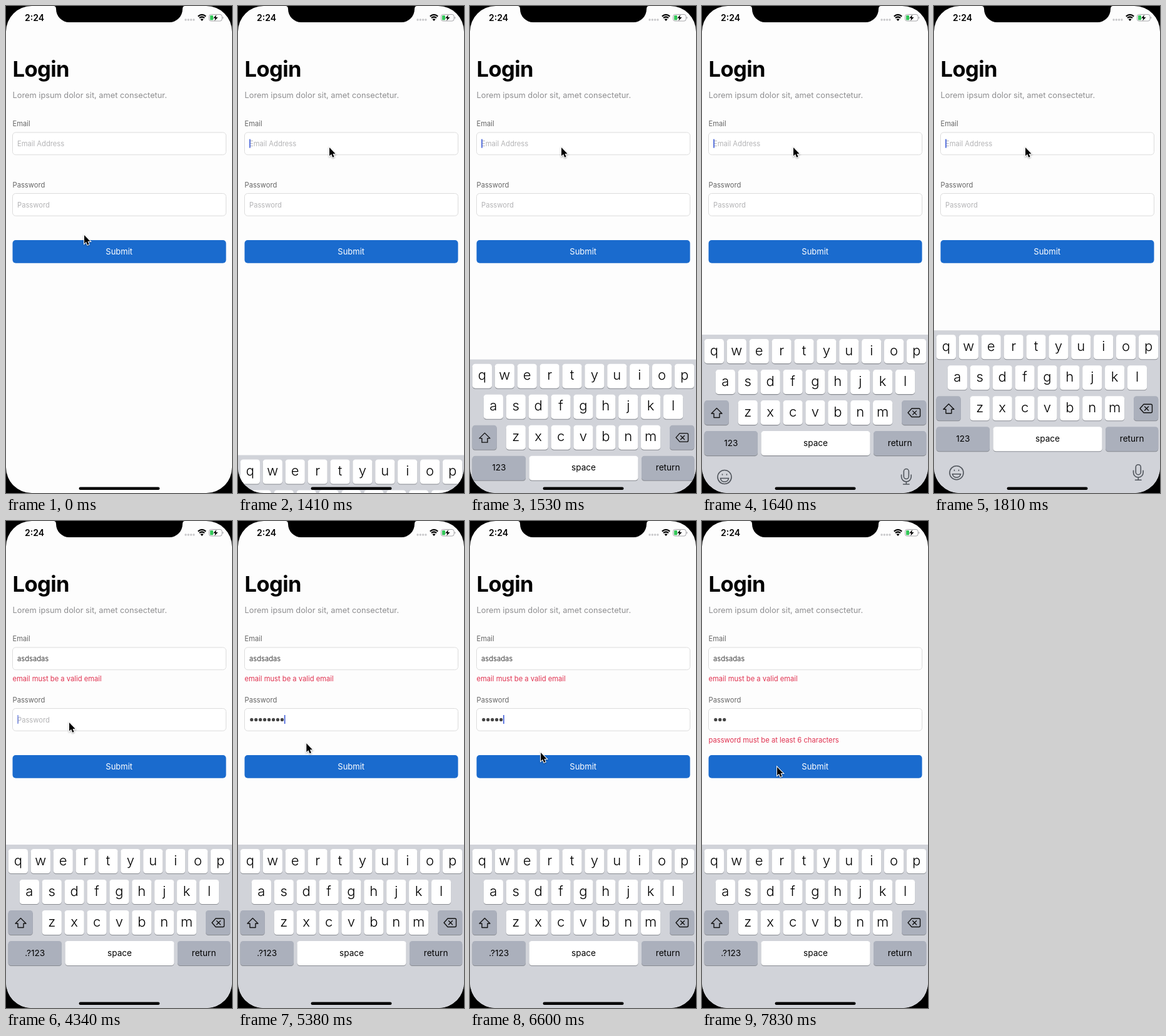
Animation, 361 px wide and 778 px high, one loop 8000 ms. Source, as an HTML page:

```html
<!DOCTYPE html>
<html lang="en">
<head>
<meta charset="utf-8">
<title>Login form</title>
<style>
html, body { margin: 0; width: 100%; height: 100%; overflow: hidden; background: #000; }
svg { display: block; width: 361px; height: 778px; }
text { font-family: Inter, Roboto, sans-serif; font-size: 11.2px; white-space: pre; }
.mid { text-anchor: middle; }
.title { font-size: 34.5px; font-weight: 700; letter-spacing: -.6px; }
.lead { font-size: 12.8px; fill: #8e8e90; }
.label { fill: #666; }
.hint { fill: #b4b4b6; }
.value { fill: #444; }
.error { fill: #e0314f; }
.box { fill: #fff; stroke: #dcdcdc; }
.letter { font-size: 22px; font-weight: 300; }
.word { font-size: 13.6px; }
.icon { fill: none; stroke: #111; stroke-width: 1.4; stroke-linejoin: round; stroke-linecap: round; }
.soft { fill: none; stroke: #50555c; stroke-width: 1.6; stroke-linecap: round; }
</style>
</head>
<body>
<svg viewBox="0 0 361 778">
  <defs><clipPath id="round"><rect width="361" height="778" rx="41"/></clipPath></defs>
  <rect width="361" height="778"/>
  <g clip-path="url(#round)">
    <rect width="361" height="778" fill="#fdfdfd"/>
    <text class="title" x="10.5" y="113">Login</text>
    <text class="lead" x="10.5" y="146.5">Lorem ipsum dolor sit, amet consectetur.</text>

    <text class="label" x="10.5" y="192">Email</text>
    <rect class="box" x="10.5" y="202" width="341" height="35.7" rx="5"/>
    <text class="hint" id="mailHint" x="18" y="224">Email Address</text>
    <text class="value" id="mail" x="18" y="224"></text>
    <text class="error" id="mailError" x="10.5" y="256">email must be a valid email</text>

    <text class="label" x="10.5" y="289.5">Password</text>
    <rect class="box" x="10.5" y="299.5" width="341" height="35.7" rx="5"/>
    <text class="hint" id="passHint" x="18" y="321.5">Password</text>
    <g id="dots" fill="#444"></g>
    <text class="error" id="passError" x="10.5" y="353.5">password must be at least 6 characters</text>

    <g id="button">
      <rect x="10.5" y="374" width="341" height="36.7" rx="5" fill="#1a6bce"/>
      <text class="mid" x="180.7" y="397.3" fill="#fff" style="font-size:13px">Submit</text>
    </g>
    <rect id="caret" width="1.7" height="14" fill="#4562da"/>

    <g id="keyboard">
      <rect width="361" height="270" fill="#d1d3d9"/>
      <g id="keys"></g>
      <path class="icon" d="M23.5 117.5L32 126H28V132.5H19V126H15Z"/>
      <path class="icon" d="M335 118H346.5Q348.5 118 348.5 120V129.5Q348.5 131.5 346.5 131.5H335L329 124.75ZM336.5 121.8L342.5 127.8M342.5 121.8L336.5 127.8"/>
      <g id="tools" class="soft">
        <circle cx="36" cy="227.5" r="11"/>
        <path d="M29.5 229.5Q30.5 235 36 235T42.5 229.5ZM32.5 223V224M39.5 223V224"/>
        <rect x="322.3" y="214.5" width="8" height="16" rx="4"/>
        <path d="M318.5 224V227A7.8 7.8 0 0 0 334.1 227V224M326.3 235V239M321.5 239H331"/>
      </g>
    </g>

    <path d="M76 0Q80 0 80 5A21 21 0 0 0 101 26H261A21 21 0 0 0 282 5Q282 0 286 0Z"/>
    <text x="30" y="23.5" style="font-size:14px;font-weight:600">2:24</text>
    <path d="M287 22H301" stroke="#c8c8ca" stroke-width="3.4" stroke-linecap="round" stroke-dasharray="0 4.3"/>
    <path d="M306.8 16.6Q313 11.2 319.2 16.6M309 19.2Q313 15.8 317 19.2" fill="none" stroke="#000" stroke-width="2.2"/>
    <path d="M310.5 21.2Q313 19.2 315.5 21.2L313 24Z"/>
    <rect x="324.5" y="13.5" width="20.5" height="10.5" rx="3" fill="#fff" stroke="#a5a5a8"/>
    <rect x="326" y="15" width="5" height="7.5" rx="1.3" fill="#34c759"/>
    <path d="M346 17V20.5Q347.3 20 347.3 18.75T346 17Z" fill="#a5a5a8"/>
    <path d="M336 14L331 19.5H334.3L333.2 23.8L338.5 17.9H335.2Z"/>
    <rect x="116.5" y="768.5" width="129" height="4.5" rx="2.25"/>
  </g>
  <path id="pointer" d="M0 0V13.6L3.1 10.8L5.2 15.8L7.6 14.8L5.5 9.9H9.6Z" stroke="#fff" stroke-width="2" style="paint-order:stroke;filter:drop-shadow(0 1px 1px #0005)"/>
</svg>
<script>
const LOOP = 8000, TICK = 58;
const MAIL_TAP = 1350, PASS_TAP = 3800, SUBMIT_TAP = 7660;
const WORD = "asdsadas", DOT_GAP = 6.95;
const $ = id => document.getElementById(id);
const clamp = (v, lo, hi) => Math.min(hi, Math.max(lo, v));
const show = (id, on) => $(id).style.display = on ? "" : "none";

// a run of keystrokes: n presses, gap ms apart; step -1 deletes
const run = (start, gap, n, step = 1) => ({ start, gap, n, step });
const mailRuns = [run(1990, 115, 3), run(2580, 60, 5)];
const passRuns = [run(4800, 1, 2), run(4970, 56, 6), run(6260, 170, 5, -1)];
const moves = [
  { start: 360, end: 760, x: 146, y: 226 },
  { start: 3060, end: 3570, x: 101, y: 322 },
  { start: 5140, end: 5540, x: 113, y: 370 },
  { start: 7310, end: SUBMIT_TAP, x: 120, y: 393 }
];

const presses = (r, t) => clamp(Math.floor((t - r.start) / r.gap) + 1, 0, r.n);
const count = (runs, t) => runs.reduce((sum, r) => sum + r.step * presses(r, t), 0);

function lastEdit(t) {
  const runs = [run(MAIL_TAP, 1, 1), run(PASS_TAP, 1, 1), ...mailRuns, ...passRuns];
  return Math.max(0, ...runs.filter(r => t >= r.start).map(r => r.start + r.gap * (presses(r, t) - 1)));
}

// solid after an edit, then fades out and back in
function caretAlpha(t) {
  if (t < MAIL_TAP || t >= SUBMIT_TAP) return 0;
  const s = t - lastEdit(t) - 540;
  const ticks = from => s < from ? 0 : Math.floor((s - from) / 60) + 1;
  return clamp(1 - ticks(0) * .35, 0, 1) + clamp(ticks(350) * .35, 0, 1);
}

function add(parent, tag, attrs, label = "") {
  const el = document.createElementNS("http://www.w3.org/2000/svg", tag);
  for (const k in attrs) el.setAttribute(k, attrs[k]);
  el.textContent = label;
  return $(parent).appendChild(el);
}

function key(x, row, width, label, dark, type = "word") {
  const y = 7 + row * 49, box = { x, width, height: 39, rx: 4.5 };
  add("keys", "rect", { ...box, y: y + 1.1, fill: "#898c92" });
  add("keys", "rect", { ...box, y, fill: dark ? "#abb0bc" : "#fff" });
  const base = y + (type === "letter" ? 25.5 : 23.8);
  return add("keys", "text", { class: "mid " + type, x: x + width / 2, y: base }, label);
}

["qwertyuiop", "asdfghjkl", "zxcvbnm"].forEach((letters, row) =>
  [...letters].forEach((c, i) =>
    key(181 + (i - letters.length / 2) * 35.9 + 2.3, row, 31.2, c, false, "letter")));
key(3.6, 2, 39.2, "", true);
key(319, 2, 39.2, "", true);
const modeKey = key(3.6, 3, 85.4, "123", true);
key(94.4, 3, 174.2, "space");
key(274, 3, 84.2, "return", true);
const dots = [...WORD].map((_, i) =>
  add("dots", "circle", { cx: 21.8 + i * DOT_GAP, cy: 317.4, r: 2.6 }));

function pointerAt(t) {
  let x = 125, y = 366;
  for (const m of moves) {
    if (t < m.start) break;
    const held = (Math.floor((t - m.start) / TICK) + 1) * TICK;
    const p = Math.min(1, held / (m.end - m.start + TICK));
    const e = p * p * (3 - 2 * p);
    x += (m.x - x) * e;
    y += (m.y - y) * e;
  }
  return `translate(${x} ${y})`;
}

// critically damped spring, sampled on the tick
function keyboardTop(t) {
  const held = Math.floor((t - MAIL_TAP) / TICK + .03) * TICK;
  const s = Math.max(0, held - 10) * .019;
  return 517 + 261 * (1 + s) * Math.exp(-s);
}

function draw(t) {
  const typed = count(mailRuns, t), secret = count(passRuns, t), second = t >= PASS_TAP;
  $("mail").textContent = WORD.slice(0, typed);
  show("mailHint", !typed);
  show("passHint", !secret);
  show("mailError", second);
  show("passError", t >= SUBMIT_TAP + TICK);
  show("tools", !second);
  modeKey.textContent = second ? ".?123" : "123";
  dots.forEach((d, i) => d.style.display = i < secret ? "" : "none");

  const end = second ? secret * DOT_GAP : typed ? $("mail").getComputedTextLength() : 0;
  $("caret").setAttribute("x", 18.2 + end);
  $("caret").setAttribute("y", second ? 310 : 212.7);
  $("caret").setAttribute("opacity", caretAlpha(t));

  const press = clamp((t - SUBMIT_TAP) / 170, 0, 1);
  $("button").setAttribute("opacity", 1 - .4 * Math.sin(press * Math.PI));
  $("keyboard").setAttribute("transform", `translate(0 ${keyboardTop(t)})`);
  $("pointer").setAttribute("transform", pointerAt(t));
}

const began = performance.now();
function frame() {
  draw((performance.now() - began) % LOOP);
  requestAnimationFrame(frame);
}
frame();
</script>
</body>
</html>
```
